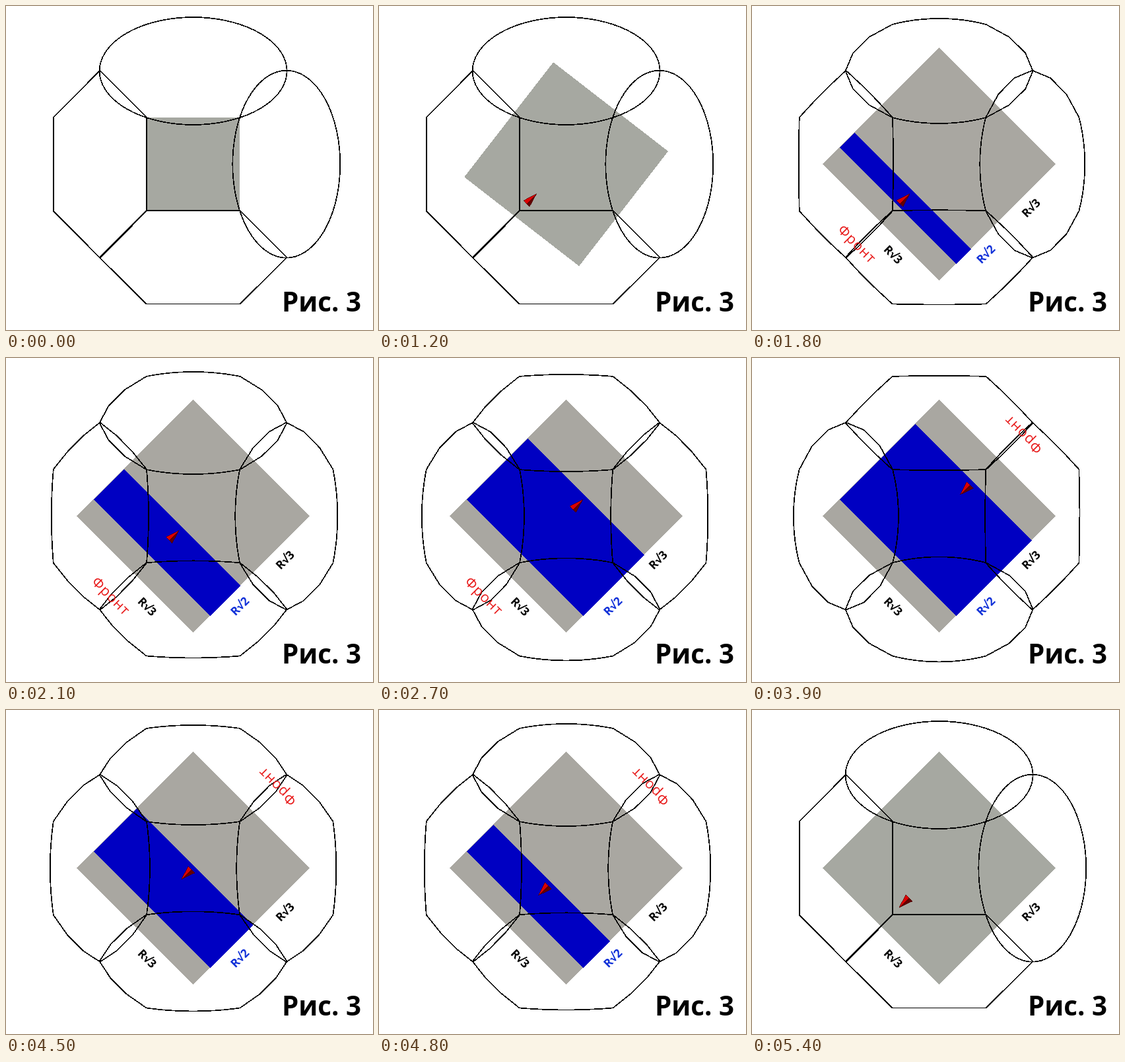
An HTML page for the animation above (5.7 s loop, 556 by 491 pixels).

```html
<!DOCTYPE html>
<html lang="ru">
<head>
<meta charset="utf-8">
<style>
html, body { margin: 0; width: 100%; height: 100%; overflow: hidden; background: #fff; }
svg { display: block; width: 556px; height: 491px; }
text { font-family: "Open Sans", "Noto Sans", sans-serif; text-anchor: middle; }
polygon, path { shape-rendering: crispEdges; }
.label { font-size: 17.5px; font-weight: 700; }
.lobe { fill: none; stroke: #000; stroke-width: 1.7; stroke-linejoin: round; }
</style>
</head>
<body>
<svg viewBox="0 0 556 491">
  <rect width="556" height="491" fill="#fff"/>
  <polygon id="square"/>
  <polygon id="band" fill="#0000c2"/>
  <g id="lobes"></g>
  <g id="arrow">
    <polygon id="light" fill="#dc0000"/>
    <polygon id="dark" fill="#640000"/>
    <polygon id="edge" fill="none" stroke="#400" stroke-width=".6"/>
  </g>
  <g id="sides" class="label">
    <text transform="translate(214 376.5) rotate(45)" dy=".36em">R√3</text>
    <text transform="translate(422.5 306) rotate(-45)" dy=".36em">R√3</text>
  </g>
  <text id="width" class="label" fill="#1030d8" transform="translate(354 376) rotate(-45)" dy=".36em">R√2</text>
  <text id="front" font-size="21.5" letter-spacing="1" fill="#e81c1c" dy=".33em">Фронт</text>
  <text x="478" y="463" font-size="40.3" font-weight="700">Рис. 3</text>
</svg>
<script>
const CX = 283.6, CY = 239.7, STEP = 300, COUNT = 19;
const RX = 142, RY = 81.5, DIST = 141.2;
// Half-diagonal and remaining turn in degrees while the square grows
const GROWTH = [[100, 45], [100, 45], [113.5, 32.6], [133.6, 20], [155.7, 7.2], [176.5, 0]];
const $ = id => document.getElementById(id);
const show = (id, on) => $(id).setAttribute("visibility", on ? "visible" : "hidden");
const points = (id, list) => $(id).setAttribute("points", list.map(p => p.join()).join(" "));

const lobes = [0, 1, 2, 3].map(i => {
  const path = document.createElementNS("http://www.w3.org/2000/svg", "path");
  path.setAttribute("class", "lobe");
  path.setAttribute("transform", `translate(${CX} ${CY}) rotate(${i * 90}) translate(0 ${-DIST})`);
  $("lobes").append(path);
  return path;
});

// Hexagon at bulge 0, ellipse at bulge 1; slanted edges bend in coarse steps between
function lobePath(bulge) {
  const at = a => [RX * Math.cos(a), RY * Math.sin(a)];
  const out = [], arc = Math.PI / 3;
  for (let i = 0; i < 6; i++) {
    const a = at(i * arc), b = at((i + 1) * arc);
    const parts = bulge < 1 && i % 3 !== 1 ? 3 : 12;
    for (let j = 0; j < parts; j++) {
      const u = j / parts, e = at((i + u) * arc);
      out.push([0, 1].map(c => {
        const line = a[c] + (b[c] - a[c]) * u;
        return (line + (e[c] - line) * bulge).toFixed(2);
      }).join());
    }
  }
  return "M" + out.join("L") + "Z";
}

function drawSquare(n) {
  const [r, turn] = GROWTH[Math.min(n, 5)];
  points("square", [0, 1, 2, 3].map(i => {
    const a = (i * 90 - 90 - turn) * Math.PI / 180;
    return [CX + r * Math.cos(a), CY + r * Math.sin(a)];
  }));
}

function drawBand(top) {
  const low = 133, sum = 347.2, side = 176.5;
  points("band", [
    [top, sum - top], [low, sum - low],
    [low + side, sum - low + side], [top + side, sum - top + side]
  ]);
}

// The arrow rests at the start until the band's edge reaches it
function drawArrow(top, back) {
  const x = Math.max(top + 88, 243), y = 522.8 - x;
  const shape = back
    ? [[-20, 19.5], [-10, 0], [0, 10]]
    : [[-4.5, 5], [-24, 15], [-15, 24.5]];
  const [tip, a, b] = shape.map(p => [x + p[0], y + p[1]]);
  const mid = [(a[0] + b[0]) / 2, (a[1] + b[1]) / 2];
  points("light", [tip, a, mid]);
  points("dark", [tip, mid, b]);
  points("edge", [tip, a, b]);
}

function render(ms) {
  const n = Math.floor(ms / STEP) % COUNT;
  const k = n < 6 ? 0 : n < 12 ? n - 5 : 18 - n;
  const back = n >= 12;
  const top = 271.8 - (6 - k) * (back ? 24.6 : 23.3);
  const bulge = step => Math.max(0, (2 * step - 1) / 11);
  lobes.forEach((path, i) => path.setAttribute("d", lobePath(bulge(i < 2 ? 6 - k : k))));
  drawSquare(n);
  $("square").setAttribute("fill", k ? "#a9a7a1" : "#a6a8a1");
  drawBand(top);
  drawArrow(top, back);
  $("front").setAttribute("transform",
    back ? "translate(411 116) rotate(225)" : "translate(159 361) rotate(45)");
  show("arrow", n > 0);
  show("sides", n > 4);
  ["band", "width", "front"].forEach(id => show(id, k > 0));
}

function tick() {
  render(performance.now());
  requestAnimationFrame(tick);
}
tick();
</script>
</body>
</html>
```
